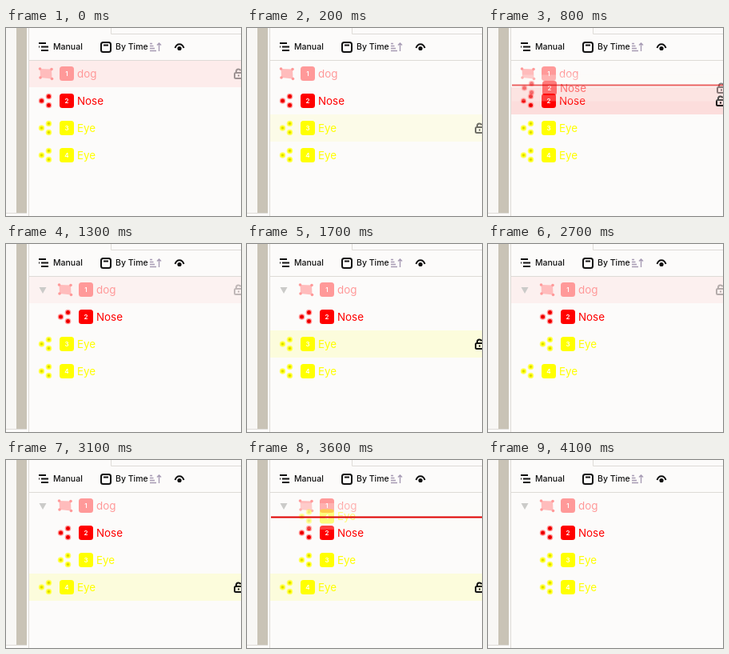
An HTML page for the animation above (4500 ms loop, 294x235 px).

```html
<!DOCTYPE html>
<html lang="en">
<head>
<meta charset="utf-8">
<title>Nesting labels by drag and drop</title>
<style>
  html, body { margin: 0; width: 100%; height: 100%; overflow: hidden; background: #fcfbfa; }
  svg { display: block; width: 294px; height: 235px; }
  text { font-family: Inter, "Open Sans", sans-serif; }
  .tool { font-size: 10.5px; font-weight: 500; fill: #111; }
  .label { font-size: 13.4px; }
  .digit { font-size: 8px; font-weight: 600; fill: #fff; text-anchor: middle; }
  .ink { fill: none; stroke: #111; stroke-width: 2; }
</style>
</head>
<body>
<svg viewBox="0 0 294 235">
  <rect width="294" height="235" fill="#fcfbfa"/>
  <rect width="13" height="231" fill="#f8f7f5"/>
  <rect x="13" width="13" height="231" fill="#c9c3b6"/>
  <path d="M0 231.5H26M28.5 0V235M131.5 0V7.5H294M29 40.5H294" fill="none" stroke="#dedbd7"/>

  <path class="ink" d="M41 19H50M44 23.5H53M44 28H53M41 23.5H42"/>
  <text class="tool" x="59" y="27">Manual</text>
  <rect class="ink" x="119" y="18" width="12" height="12" rx="2.5"/>
  <path class="ink" d="M122 21.5H128"/>
  <text class="tool" x="137" y="27">By Time</text>
  <path d="M180 19.5H183M180 22.5H184.500M180 25.500H186M180 28.500H188M191.500 29V19M189 21.500L191.500 19L194 21.500"
        fill="none" stroke="#a79bb4" stroke-width="1.4"/>
  <path class="ink" d="M211.500 25C213.500 18.500 220.500 18.500 222.500 25"/>
  <circle cx="217" cy="25.500" r="2.600" fill="#111"/>
  <g id="list"></g>
</svg>
<script>
const LOOP = 4500, INDENT = 24;
const rows = [
  { name: 'dog', color: '#ff9999' },
  { name: 'Nose', color: '#ff0000', halo: '#ff9c9c', core: '#d80000' },
  { name: 'Eye', color: '#ffff00', halo: '#ffff66', core: '#d6d600' },
  { name: 'Eye', color: '#ffff00', halo: '#ffff66', core: '#d6d600' }
];
const centerY = i => 57 + 34 * i;

// Each step: time, nested children, hovered row, hover strength, drag [x shift, center y, drop line y]
const steps = [
  [0, 0, 0, .8],
  [100, 0, 1, .6],
  [200, 0, 2, .6],
  [300, 0, 1, 1],
  ...drag(800, 4, 0, 1, [1, 75, 71.5], [24, 70.5, 71.5]),
  [1300, 1, 0, .5],
  [1600, 1, 1, .5],
  [1700, 1, 2, 1],
  ...drag(2200, 3, 1, 2, [23, 83, 105.5], [24, 58, 71.5]),
  [2700, 2, 0, .6],
  [2800, 2, 1, .6],
  [2900, 2, 2, 1],
  [3100, 2, 3, 1],
  ...drag(3400, 3, 2, 3, [21, 111, 105.5], [24, 70.5, 71.5]),
  [3800, 3, 0, .5],
  [4000, 3, 1, .5],
  [4100, 3, 0, 0]
];

function drag(start, count, nested, row, from, to) {
  return Array.from({ length: count }, (_, k) => {
    const p = k / (count - 1), mix = j => from[j] + (to[j] - from[j]) * p;
    return [start + 100 * k, nested, row, 1, [mix(0), mix(1), k ? to[2] : from[2]]];
  });
}

function icon(r) {
  const dots = (pts, radius, fill) =>
    pts.map(([x, y]) => `<circle cx="${x}" cy="${y}" r="${radius}" fill="${fill}"/>`).join('');
  if (r.halo) {
    const pts = [[44.5, 0], [53.5, -5.5], [53.5, 5.5]];
    return dots(pts, 3.8, r.halo) + dots(pts, 2.5, r.color) + dots(pts, 1.4, r.core);
  }
  return '<path d="M42.500 -6L57 -5.500L57.500 6.500L43 5Z" fill="#ffbcbc"/>' +
    dots([[42.5, -6], [57, -5.5], [57.5, 6.5], [43, 5]], 1.8, r.color);
}

function item(i, dx, y) {
  const r = rows[i];
  return `<g transform="translate(${dx} ${y})">${icon(r)}
    <rect x="67" y="-9" width="18" height="18" rx="3.5" fill="${r.color}"/>
    <text class="digit" x="76" y="3">${i + 1}</text>
    <text class="label" x="89" y="4.5" fill="${r.color}">${r.name}</text></g>`;
}

function lock(dx, y, alpha) {
  return `<g class="ink" transform="translate(${dx} ${y})" opacity="${alpha}">
    <rect x="286" y="-1" width="10" height="7" rx="1.5"/>
    <path d="M288 -1V-3A2.800 2.800 0 0 1 293.500 -3.500M290 2.500H292"/></g>`;
}

function hover(i, strength) {
  const top = i ? 40 + 34 * i : 41, tint = i ? .12 : .2;
  return `<rect x="29" y="${top}" width="265" height="${74 + 34 * i - top}"
    fill="${rows[i].color}" opacity="${tint * strength}"/>` +
    lock(0, centerY(i), i ? strength : strength * .5);
}

function ghost(i, [dx, y, line]) {
  return `<g opacity=".5"><rect x="${29 + dx}" y="${y - 16.5}" width="265" height="33"
    fill="#fcfaf6" opacity=".5"/>${item(i, dx, y)}${lock(dx, y, 1)}</g>
    <path d="M30 ${line}H294" stroke="#e00000" stroke-width="2" opacity="${i === 1 ? .6 : 1}"/>`;
}

const list = document.getElementById('list');
let shown;

function draw(now) {
  const t = now % LOOP, step = steps.findLast(s => s[0] <= t);
  if (step !== shown) {
    shown = step;
    const [, nested, row, strength, moving] = step;
    list.innerHTML = hover(row, strength) +
      (nested ? '<path d="M41.500 54H50.500L46 62Z" fill="#cbcbc9"/>' : '') +
      rows.map((_, i) => {
        const indented = nested && i <= nested;
        return item(i, indented ? INDENT : 0, centerY(i));
      }).join('') +
      (moving ? ghost(row, moving) : '');
  }
}

const start = performance.now();
function tick() {
  draw(performance.now() - start);
  requestAnimationFrame(tick);
}
tick();
</script>
</body>
</html>
```
